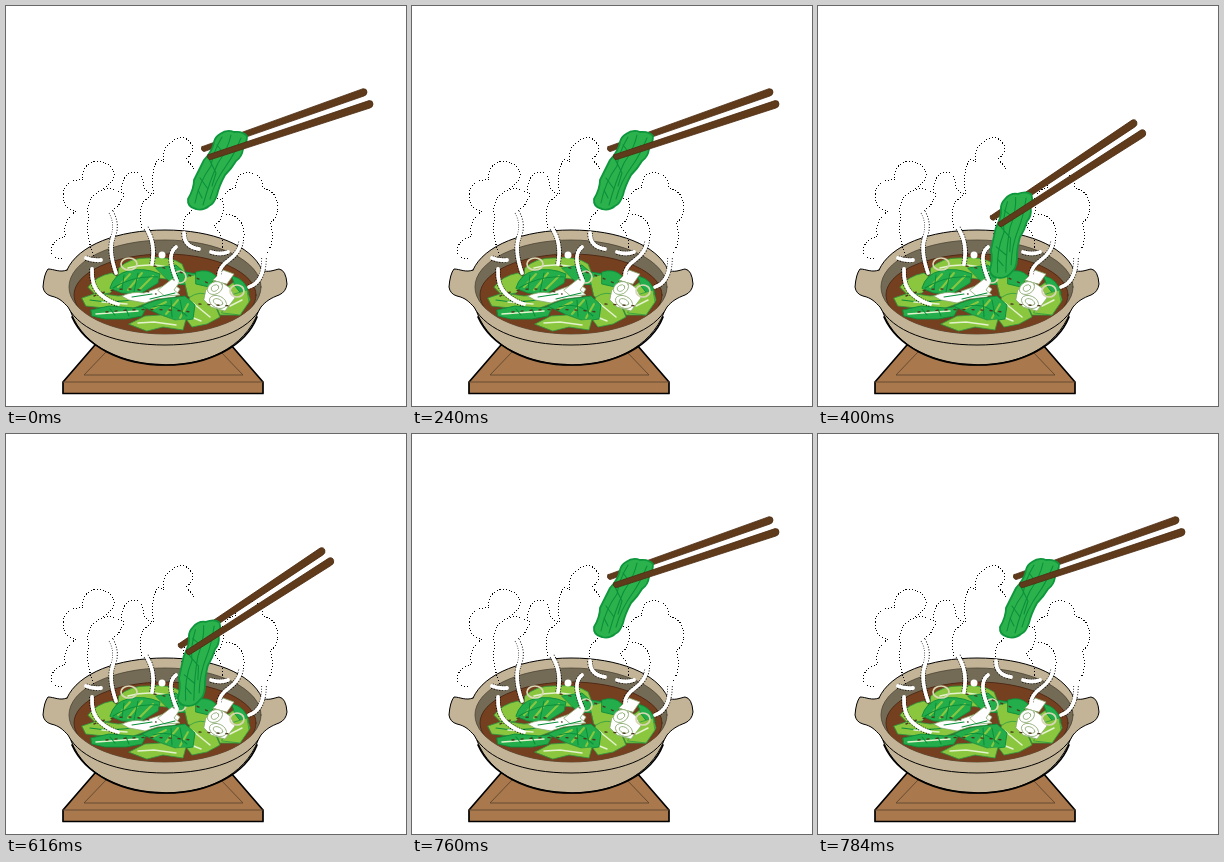
An HTML page that plays this animation: 400x400 px, repeating every 0.8 s.

```html
<!DOCTYPE html>
<html lang="en">
<head>
<meta charset="utf-8">
<title>Hot pot</title>
<style>
  html, body { margin: 0; width: 100%; height: 100%; overflow: hidden; background: #fff; }
  svg { display: block; width: 100vw; height: 100vh; }
  path, ellipse, circle { stroke-linecap: round; stroke-linejoin: round; }
  .pot { fill: #c3b497; stroke: #000; stroke-width: 1; }
  .wood { fill: #a9794d; stroke: #000; stroke-width: 1.7; }
  .groove { fill: none; stroke: #5e4630; stroke-width: .9; }
  .dots { fill: none; stroke: #000; stroke-dasharray: 1 2; stroke-linecap: butt; shape-rendering: crispEdges; }
  .dark { fill: #23ae4b; stroke: #0d8d3a; stroke-width: .9; }
  .lime { fill: #8bc63f; stroke: #2c9c40; stroke-width: .8; }
  .stem { fill: #fff; stroke: #8cab70; stroke-width: .8; }
  .vein { fill: none; stroke: #0b8f3a; stroke-width: 1.1; }
  .stripe { fill: none; stroke: #8bc63f; stroke-width: 2; }
  .pale { fill: none; stroke: #e4f2cd; stroke-width: 1.5; }
  .stick { fill: #5f3a1b; stroke: #4d2d13; stroke-width: .8; }
  .edge { fill: none; stroke: #000; stroke-width: 5.4; stroke-dasharray: 1 1.6; stroke-linecap: butt; }
  .vapor { fill: none; stroke: #fff; stroke-width: 3.8; }
</style>
</head>
<body>
<svg viewBox="0 0 400 400">
  <defs>
    <clipPath id="inside"><ellipse cx="159" cy="281" rx="96" ry="47"/></clipPath>
  </defs>

  <!-- stand -->
  <path class="wood" d="M89 339H225L257 376V387.5H57V376Z"/>
  <path class="groove" d="M57 376H257M101 345L78 369H237L214 345"/>

  <!-- pot -->
  <path class="pot" d="M63 300C72 337 112 359 160 359C207 359 245 336 254 300Z"/>
  <path fill="none" stroke="#000" stroke-width="1.7" d="M66 311C79 340 115 359 160 359C205 359 240 339 251 311"/>
  <path class="pot" d="M61 264C54 267 48 263 42 263Q38 268 37 281Q38 288 45 290C54 292 57 296 62 301C74 325 112 339 159 339C206 339 243 325 255 301C260 295 265 292 273 289Q280 286 281 278Q280 264 273 263C268 264 262 267 256 264C245 239 206 224 159 224C112 224 72 239 61 264Z"/>
  <ellipse cx="159" cy="281" rx="96" ry="47" fill="#746b57" stroke="#4b4334" stroke-width=".8"/>
  <g clip-path="url(#inside)">
    <ellipse cx="159" cy="289" rx="91" ry="41" fill="#75401f" stroke="#4e2b17"/>
  </g>

  <!-- vegetables -->
  <path class="lime" d="M113 262Q124 251 144 252Q164 250 176 258L180 268L160 273L138 270L112 273Z"/>
  <path class="pale" d="M122 262Q146 255 172 264"/>
  <path class="dark" d="M150 262L170 259L178 266L192 268L190 279L166 278Z"/>
  <path class="lime" d="M82 281Q90 270 106 267L116 275L104 287L90 289Z"/>
  <path class="dark" d="M104 282Q108 268 122 265Q138 261 154 268L152 277L134 288L116 287Z"/>
  <path class="stripe" d="M112 281L124 268M122 284L136 267M134 283L147 270"/>
  <path class="vein" d="M107 282Q128 269 152 271M118 269L116 284M132 267L128 286"/>
  <path class="lime" d="M76 292L91 287L112 290L137 288L141 297L125 303L98 302L80 300Z"/>
  <path class="vein" d="M84 294Q108 298 137 292"/>
  <path class="lime" d="M178 272L198 266L210 272L204 285L214 309L234 309L244 294L240 280L228 276L214 286L196 300L182 290Z"/>
  <path class="dark" d="M190 266Q202 262 210 270L203 281L190 278Z"/>
  <path class="dark" d="M226 270Q240 273 243 288L237 290L229 280Z"/>
  <path class="lime" d="M222 290L241 284L243 296L234 309L216 307Z"/>
  <path class="lime" d="M184 291Q194 284 205 290L214 311L201 318L186 321L177 309Z"/>
  <path class="pale" d="M187 297L204 311M180 309L195 315M224 300L236 294"/>
  <path class="stem" d="M116 290Q126 285 138 287L166 277L174 283L169 291L151 293L139 297L123 294Z"/>
  <path class="stem" d="M152 284L166 273L173 277L168 284L174 289L159 290Z"/>
  <path class="vein" d="M126 291L146 288M144 293L169 287"/>
  <path class="dark" d="M85 304L103 300L128 302L141 300L136 310L120 313L99 313L86 310Z"/>
  <path class="pale" d="M90 308L132 305M96 296L121 298"/>
  <path class="vein" d="M104 303l5 6M120 303l3 7"/>
  <path class="dark" d="M136 300Q149 293 165 292L179 290L189 299L187 313L172 315L155 309Z"/>
  <path class="stripe" d="M146 303L160 296M160 308L172 294M174 312L182 298"/>
  <path class="vein" d="M147 301Q166 295 181 310M165 294l1 17M174 294l3 15"/>
  <path class="lime" d="M123 318L139 310L155 309L169 314L180 313L177 324L157 321L141 325Z"/>
  <path class="pale" d="M132 317L148 316L170 319"/>
  <path class="stem" d="M200 284L214 275L224 282L229 292L219 305L205 301L198 294Z"/>
  <path class="stem" d="M207 274L217 264L228 268L221 278Z"/>
  <g class="stem">
    <ellipse cx="209" cy="282" rx="8" ry="6" transform="rotate(-28 209 282)"/>
    <ellipse cx="209" cy="282" rx="4" ry="3" transform="rotate(-28 209 282)"/>
    <ellipse cx="212" cy="296" rx="9" ry="6" transform="rotate(24 212 296)"/>
    <ellipse cx="212" cy="296" rx="5" ry="3" transform="rotate(24 212 296)"/>
  </g>
  <g fill="none" stroke="#d8d7b5" stroke-width="1.7">
    <ellipse cx="123" cy="258" rx="8" ry="6"/>
    <ellipse cx="174" cy="271" rx="6" ry="6"/>
    <ellipse cx="231" cy="285" rx="7" ry="6"/>
  </g>
  <path fill="none" stroke="#4d3a1c" stroke-width="1.4" stroke-dasharray="2 7" d="M88 290Q117 277 150 288M148 260Q178 265 206 279M100 306Q145 301 185 306M193 298L226 300"/>

  <!-- steam -->
  <path class="dots" d="M56 252Q45 253 45 244Q47 233 60 230Q55 216 70 205Q57 203 57 190Q58 173 77 174Q75 158 91 155Q109 157 108 171Q105 178 96 184"/>
  <path class="dots" d="M88 250Q79 229 83 211Q79 197 89 188Q103 178 115 187Q116 168 127 166Q136 166 137 175Q138 187 148 188Q143 170 152 153L158 156Q155 142 167 135Q179 127 186 139Q189 148 179 153Q190 162 187 164"/>
  <path class="dots" d="M118 187Q116 198 106 205M136 222Q132 207 137 196L146 188M178 226Q175 213 185 205M205 193Q218 190 218 203Q216 215 208 220Q218 229 216 242M197 202Q190 199 183 208"/>
  <path class="dots" d="M216 193Q224 180 230 182Q229 168 242 166Q256 168 257 182Q271 185 272 201Q272 213 264 216Q271 235 258 252M237 235Q241 220 230 211Q223 207 218 210"/>
  <g id="strands"></g>
  <circle cx="156" cy="249" r="3.5" fill="#fff"/>

  <!-- chopsticks with a leaf -->
  <g id="pick">
    <path class="stick" d="M196 140.7L357 82.7Q361 82.5 361 86Q361 89 358 90L198 145.6Q194 144 196 140.7Z"/>
    <path fill="#2bb24c" stroke="#0d963c" stroke-width="1.8" d="M214 128Q221 123 228 126Q237 125 241 130Q241 137 237 143Q236 151 230 155Q226 162 219 169Q213 180 211 189Q208 198 203 200Q197 205 190 203Q181 201 182 193Q188 183 188 174Q193 164 198 154Q207 144 208 136Q209 131 214 128Z"/>
    <path class="vein" d="M216 131Q207 146 205 160Q193 176 189 197M225 129Q222 143 212 157Q204 174 197 199M235 132Q228 149 220 160Q209 175 204 193M211 139L218 148M203 153L210 167L206 180M229 140L221 145M194 172L202 183M192 184L196 192"/>
    <path class="stick" d="M202 148.8L363 94.6Q367 94.3 367 98Q367 101 364 102L204 153.8Q200 152 202 148.8Z"/>
  </g>
</svg>
<script>
  const strands = [
    "M80 252Q87 255 95 254",
    "M86 263Q85 280 94 288T112 298",
    "M105 206Q112 218 107 231T110 267",
    "M140 222Q150 237 146 258",
    "M170 241Q164 246 165 255T171 275",
    "M178 227Q178 241 193 243",
    "M205 246Q214 249 222 246",
    "M235 236Q233 247 223 254T213 269",
    "M258 252Q258 276 243 281"
  ];
  document.getElementById("strands").innerHTML = strands.map(d =>
    `<path class="edge" d="${d}"/><path class="vapor" d="${d}"/>`).join("");

  const pick = document.getElementById("pick");
  const dipped = "translate(174 212) rotate(-14.3) translate(-197 -143)";

  function draw(now) {
    const t = now % 800;
    pick.setAttribute("transform", t >= 400 && t < 760 ? dipped : "");
    requestAnimationFrame(draw);
  }
  draw(0);
</script>
</body>
</html>
```
